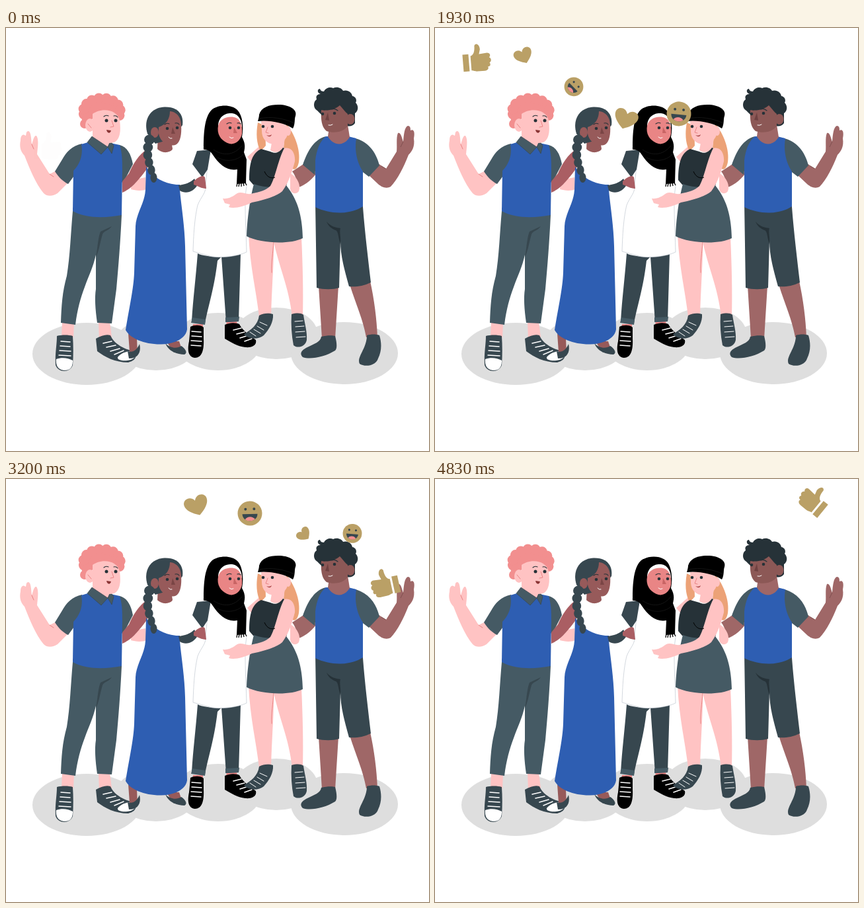
Write an HTML page that moves like this. It is 640 by 640 pixels and loops after 4860 ms.

```html
<!DOCTYPE html>
<html lang="en">
<head>
<meta charset="utf-8">
<title>Friends and reactions</title>
<style>
html, body { margin: 0; width: 100%; height: 100%; overflow: hidden; background: #fff; }
svg { display: block; width: 100vw; height: 100vh; }
.blue { fill: #2e5eb2; } .slate { fill: #455a64; } .dark { fill: #37474f; } .ink { fill: #263238; }
.pink { fill: #ffc3c3; } .rose { fill: #f28f8f; } .warm { fill: #e98585; }
.tan { fill: #9f6767; } .brown { fill: #8c5856; } .mid { fill: #975a5a; } .russet { fill: #aa5e63; }
.white { fill: #fff; } .gold { fill: #baa066; } .blond { fill: #eca277; }
.lace { fill: none; stroke: #fff; stroke-width: 1.5; stroke-linecap: round; }
.thin { stroke-width: 1; }
.line { fill: none; stroke: #263238; stroke-width: 1.1; stroke-linecap: round; }
.fold { fill: none; stroke: #e88585; stroke-width: 1; stroke-linecap: round; }
</style>
</head>
<body>
<svg viewBox="0 0 640 640" xmlns="http://www.w3.org/2000/svg">
<defs>
  <g id="thumb" class="gold">
    <path d="M-19-8L-10-8L-10 18L-19 18Z"/>
    <path d="M-7-5C-2-6 0-12 0-20C2-25 8-22 8-14L6-7L18-8C23-8 24-3 21-1C25 1 24 6 21 7C23 10 22 13 18 13C20 16 17 19 13 19L2 19C-2 19-4 17-7 17Z"/>
  </g>
  <path id="heart" class="gold" d="M0 15C-10 9-18 2-18-6C-18-15-5-18 0-8C5-18 18-15 18-6C18 2 10 9 0 15Z"/>
  <g id="smiley">
    <circle class="gold" r="18.5"/>
    <circle class="dark" cx="-6.5" cy="-6.5" r="2"/><circle class="dark" cx="6.5" cy="-6.5" r="2"/>
    <path class="dark" d="M-11.5 1L11.5 1C11 15-11 15-11.5 1Z"/>
    <path class="rose" d="M-7.5 9C-4 4 4 4 7.5 9C4 12.5-4 12.5-7.5 9Z"/>
  </g>
</defs>

<g fill="#dedede">
  <ellipse cx="122" cy="493" rx="82" ry="47"/><ellipse cx="227" cy="478" rx="62" ry="40"/>
  <ellipse cx="321" cy="474.5" rx="66" ry="43.5"/><ellipse cx="409" cy="462" rx="62" ry="39"/>
  <ellipse cx="512" cy="492" rx="81" ry="47"/>
</g>

<g id="curly">
  <path class="pink" d="M190 230L211 226L213 244C205 247 196 246 189 244Z"/>
  <path class="slate" d="M172 177C183 180 189 190 192 206L178 233L172 234Z"/>
  <path class="russet" d="M213 184C202 190 192 206 186 220L176 232L176 249C188 244 198 234 214 212Z"/>
  <path class="pink" d="M76 216L66 221L47 191C48 180 50 168 46 163C42 162 41 171 39 176C38 168 38 157 34 156C30 156 31 160 30 163C25 159 22 163 22 170C20 180 22 187 28 193C35 211 45 236 57 250C63 256 72 254 78 250L94 234Z"/>
  <path class="fold" d="M66 221L72 225M39 176L42 183"/>
  <path class="slate" d="M115 175C100 178 91 188 85 199L74 217C80 226 86 232 94 236L105 221L122 190Z"/>
  <path class="pink" d="M85 445L103 447L102 468L84 468ZM140 444L157 444L160 468L141 471Z"/>
  <path class="slate" d="M101 272L175 272L175 283C173 325 170 362 167 395L160 447L138 446C135 425 134 408 136 395L136 343C132 362 125 375 119 392C113 408 108 425 105 449L83 446C84 420 85 400 92 375C97 345 98 310 101 277Z"/>
  <path class="dark" d="M143 308L160 300C155 307 148 307 146 312C142 326 141 336 136 347C139 330 139 318 143 308Z"/>
  <path class="blue" d="M114 176L130 171L158 174L172 177C176 190 176 203 176 215L175 283C150 288 120 288 101 277L102 216C112 206 117 192 114 176Z"/>
  <path class="pink" d="M131 153L131 168L153 181L160 170Z"/>
  <path class="slate" d="M130 164L123 173L144 191L154 180ZM154 180L158 171L163 178L160 190Z" stroke="#37474f" stroke-width=".7"/>
  <g class="rose" id="curls"><ellipse cx="144" cy="122" rx="27" ry="18"/></g>
  <path class="pink" d="M131 130C142 121 168 121 172 140C174 155 173 168 164 173C150 177 136 169 131 159Z"/>
  <ellipse class="pink" cx="127" cy="147" rx="7" ry="10"/>
  <circle class="ink" cx="152" cy="140" r="2.5"/><circle class="ink" cx="166" cy="140" r="2.5"/>
  <path class="line" d="M148 134Q151 131 155 133M163 133Q167 132 169 135"/>
  <path class="fold" d="M160 140L163 149L158 150M124 145L129 151"/>
  <path fill="#8b3434" d="M152 154L159 155C158 160 153 160 152 154Z"/>
  <path class="dark" d="M77 466C84 464 95 464 101 466C102 480 102 495 101 510C97 522 79 522 75 510C74 492 77 480 77 466ZM136 470C145 465 152 463 158 465C164 479 180 486 193 489C199 496 197 503 185 506C165 506 150 498 138 489Z"/>
  <path class="white" d="M76 501C84 498 94 499 101 503C101 514 97 518 88 518C79 517 75 511 76 501ZM169 498C176 490 186 488 193 490C199 495 195 502 184 503C175 504 168 502 169 498Z"/>
  <path class="lace" d="M83 474L97 475M82 481L97 482M81 488L98 489M80 495L98 496M147 477L160 474M152 483L166 480M158 489L172 485M164 494L178 488"/>
</g>

<g id="braided">
  <path class="mid" d="M185 462L198 470L199 492L187 490ZM243 474L262 474L266 486L250 486Z"/>
  <path class="dark" d="M184 489C194 492 199 485 202 478C205 490 200 500 186 500ZM241 477C248 484 258 486 265 481C272 485 275 492 270 494C258 494 246 489 241 477Z"/>
  <path class="blue" d="M212 210C225 230 245 237 263 237C262 252 270 290 271 330L274 456C272 470 255 478 235 478.5C210 479 188 470 181 457C187 420 193 395 194 370L196 300C197 280 210 265 211 245Z"/>
  <path class="mid" d="M230 162L229 184C235 190 248 191 252 183L250 170Z"/>
  <path class="white" d="M219 190L228 182C235 190 246 190 254 183C270 181 284 190 291 205L285 229C280 234 272 237 262 237C240 236 222 215 219 190Z"/>
  <path class="dark" d="M214 160C207 137 220 120 240 119.5C262 119 269 133 267 147L250 168L226 175Z"/>
  <path class="mid" d="M231 150C243 146 248 137 248 126C260 127 265 137 265 147C266 160 264 174 256 177C243 180 233 171 231 160Z"/>
  <ellipse class="mid" cx="225" cy="158" rx="6" ry="8"/>
  <g class="dark" id="braid"></g>
  <circle class="ink" cx="244" cy="152" r="2.3"/><circle class="ink" cx="259" cy="151" r="2.3"/>
  <path class="line" d="M240 146Q243 143 247 145M256 144Q260 143 262 146"/>
  <path fill="#7a4545" d="M252 150L256 160L250 160Z"/>
  <path class="lace thin" d="M246 165Q248 168 251 167"/>
</g>

<g id="veiled">
  <path class="dark" d="M261 238C270 237 279 234 285 228L290 237C284 248 272 252 263 246Z"/>
  <path class="warm" d="M283 448L298 448L298 456L282 456ZM334 441L349 442L350 451L333 451Z"/>
  <path class="dark" d="M290 341C300 347 340 349 355 341L352 444L333 445L326 346L320 352C315 395 306 420 301 447L281 444C283 410 287 380 290 341Z"/>
  <path class="slate" d="M282 438L302 441L301 449L280 446ZM332 438L353 437L352 444L332 445Z"/>
  <path class="white" stroke="#b6bec8" stroke-width=".6" d="M307 186L355 190L364 240C360 260 363 300 364 339C350 346 325 348 312 346L283 338C284 305 286 285 290 268C295 255 303 250 302 238Z"/>
  <path class="dark" d="M289 186L310 184L305 214L297 226L282 206Z"/>
  <path class="russet" d="M284 232C290 226 298 221 301 226L303 243C296 243 290 239 284 237Z"/>
  <path d="M299 184C299 160 300 135 311 124C322 115 342 116 350 124C358 132 360 150 357 165C362 174 362 180 360 188L364 199L363 235L349 236L350 214C335 217 322 206 313 192C309 185 304 184 299 184Z"/>
  <path stroke="#000" stroke-width="1.3" d="M350 234L349 240M353 235L352 240M356 235L356 240M359 234L360 239M362 234L364 238"/>
  <path fill="none" stroke="#222" stroke-width=".6" d="M314 184C328 194 345 193 357 178M320 196C335 204 352 200 360 190"/>
  <path class="white" d="M321 149C321 133 333 128 342 129C352 130 357 140 357 150Z"/>
  <path class="warm" d="M320.5 152C321 138 334 133 345 135C356 137 358 150 357 160C355 171 346 177 338 175C328 172 320 164 320.5 152Z"/>
  <circle class="ink" cx="339" cy="151" r="2.3"/><circle class="ink" cx="352" cy="151" r="2.3"/>
  <path class="line" d="M334 145Q338 142 341 144M350 144Q353 143 355 145"/>
  <path fill="#c86464" d="M345 150L350 159L344 159Z"/>
  <path class="lace thin" d="M338 165Q341 168 344 166"/>
  <path d="M279 452C285 449 295 449 299 453L299 470C300 488 296 499 286 499C276 498 274 488 277 474ZM331 449C340 445 348 446 353 448C358 458 370 466 378 472C380 480 372 484 362 483C350 482 340 475 331 470Z"/>
  <path class="lace" d="M281 459L295 460M281 466L296 467M280 473L296 474M280 480L295 481M344 457L356 454M349 463L361 460M354 469L367 465M361 474L372 470"/>
</g>

<g id="tall">
  <path class="tan" d="M450 206L433 217C440 226 441 235 438 242C450 240 460 232 470 220Z"/>
  <path class="slate" d="M484 164C464 169 455 190 449 207L467 222L473 190Z"/>
  <path class="tan" d="M473 390L503 390L498 470L478 470ZM520 388L551 383C557 410 561 440 562 468L545 468C540 440 530 420 520 388Z"/>
  <path class="dark" d="M468 264L540 264L540 271C543 310 548 350 552 385C540 391 528 392 519 391C512 365 506 345 506 322L504 393C495 396 480 396 470 393Z"/>
  <path class="ink" d="M485 293C492 301 500 302 506 303C504 308 507 316 506 327C502 315 503 308 499 306C493 304 488 300 485 293Z"/>
  <path class="tan" d="M563 205L575 213L591 187C592 178 590 166 593 159C597 157 599 166 601 172C602 160 603 150 608 148C612 148 612 152 612 155C617 152 619 158 617 167C619 180 614 187 609 192C602 210 592 230 582 240C575 244 568 240 564 237L547 221Z"/>
  <path fill="none" stroke="#7f4f4f" d="M575 213L568 209M601 172L597 180"/>
  <path class="slate" d="M524 166C547 170 560 187 565 208L549 225C544 221 540 218 537 216L524 190Z"/>
  <path class="blue" d="M484 164L518 164L530 167C527 185 531 204 540 217L540 270C520 283 490 282 468 271L468 200C470 185 474 172 484 164Z"/>
  <path class="tan" d="M489 150L487 164C495 179 512 179 520 165L516 140Z"/>
  <path class="ink" d="M471 125C464 121 465 111 470 108C468 102 472 100 476 100C470 98 471 92 475 92C476 95 478 96 481 96C484 90 491 89 495 91C501 88 508 91 510 95C517 93 523 97 524 103C530 104 531 110 529 113C534 118 533 126 528 129L528 144C524 149 520 149 516 148L476 130Z"/>
  <path class="brown" d="M477 124C488 126 498 123 505 117C509 121 512 126 517 130L517 148C512 157 497 160 485 156C478 150 476 140 477 124Z"/>
  <ellipse class="brown" cx="521" cy="138" rx="6.5" ry="8"/>
  <circle class="ink" cx="479" cy="130" r="2.3"/><circle class="ink" cx="497" cy="129" r="2.3"/>
  <path class="line" d="M476 124Q479 122 482 124M493 123Q498 121 502 125"/>
  <path fill="#6f4141" d="M487 128L489 140L483 139Z"/>
  <path class="lace thin" d="M488 147Q491 148 494 146"/>
  <path class="dark" d="M477 467C485 465 494 465 498 466C501 478 501 485 498 488C482 498 460 502 449 498C443 492 448 487 456 483C466 478 476 475 477 467ZM546 465C552 463 560 463 565 465C569 478 568 490 563 500C559 512 542 513 535 508C530 498 546 485 546 465Z"/>
</g>

<g id="blonde">
  <path class="pink" d="M430 220C440 224 447 238 443 247C438 253 430 250 430 242ZM365 195L382 180L388 187L373 205Z"/>
  <path class="pink" d="M367 312L405 318C406 350 402 390 401 437L383 437C379 400 369 360 367 312ZM404 318L447 316C449 360 450 400 449 437L433 437C428 390 412 360 404 318Z"/>
  <path class="fold" d="M405 324C404 340 401 355 402 370"/>
  <path class="blond" d="M424 145C437 160 446 185 443 203C441 213 437 216 432 212L420 180ZM381 143C378 160 379 174 385 187L393 178L392 148Z"/>
  <path class="pink" d="M403 168L400 185C407 190 415 188 420 182L422 165Z"/>
  <path class="ink" d="M386 183L400 187C408 191 414 188 419 181L428 185L430 215L424 239C410 243 390 243 374 237L368 230C368 202 373 189 386 183Z"/>
  <path class="slate" d="M375 236C392 242 410 242 424 238C437 255 448 275 449 318C430 328 385 326 364 315C365 285 370 255 375 236Z"/>
  <path class="pink" d="M421 182C433 179 438 191 437 202C433 218 427 235 418 247C410 254 392 260 372 264C360 270 345 274 337 271L339 267L331 265L328 258C338 259 344 254 350 250C356 247 363 252 370 251C385 248 394 245 400 239C408 225 412 198 421 182Z"/>
  <path d="M391 217C395 226 401 228 407 226" fill="none" stroke="#000"/>
  <path class="pink" d="M386 141C400 138 424 143 428 152C427 166 420 175 406 176C394 175 387 168 387 155Z"/>
  <ellipse class="pink" cx="427" cy="156" rx="4" ry="7"/>
  <path d="M381 141C382 137 383 134 383 131C386 120 398 116 412 116C430 116 441 124 438 133C436 138 438 145 434 152C420 143 398 139 381 141Z"/>
  <path d="M383 137C400 133 422 137 436 144" fill="none" stroke="#222" stroke-width=".6"/>
  <circle class="ink" cx="389" cy="149" r="2.3"/><circle class="ink" cx="403" cy="149" r="2.3"/>
  <path class="fold" d="M396 150L393 158L397 159"/>
  <path fill="#a94444" d="M394 162Q399 164 402 161Q400 167 394 162Z"/>
  <path class="dark" d="M383 435C390 431 398 431 404 433C405 445 398 456 390 465C382 472 365 471 360 463C370 457 381 450 383 435ZM432 433C440 431 446 431 450 434C452 448 456 460 455 472C453 483 440 485 435 480C432 465 431 448 432 433Z"/>
  <path class="lace thin" d="M384 445L395 450M380 451L390 457M375 456L385 462M369 460L378 466M437 444L449 443M438 452L451 451M438 460L452 459M439 468L453 467"/>
</g>

<g id="icons"></g>
</svg>
<script>
const LOOP = 4860, LIFE = 2400, GAP = 400, STEPS = 4;
const make = (parent, tag, attrs) => {
  const el = document.createElementNS('http://www.w3.org/2000/svg', tag);
  for (const k in attrs) el.setAttribute(k, attrs[k]);
  return document.getElementById(parent).appendChild(el);
};

for (let i = 0; i < 11; i++) {
  const a = 2.5 + i * 0.41;
  make('curls', 'circle', { cx: 145 + 28 * Math.cos(a), cy: 126 + 20 * Math.sin(a), r: 7.8 });
}
make('curls', 'circle', { cx: 119, cy: 145, r: 7 });
for (let i = 0; i < 6; i++) {
  make('braid', 'ellipse', { cx: 217 - 4 * Math.sin(i * 0.8) + i * 0.7, cy: 169 + i * 11.5, rx: 8 - i * 0.6, ry: 7.5 });
}

// Heights and angles are spaced evenly over the life of each icon.
const icons = [
  { kind: 'thumb', x: 61, y: [180, 153, 102, 53, 36], turn: [0, 11, 22, 6, -50] },
  { kind: 'heart', x: 134, size: 0.78, y: [115, 96, 62, 28, 9], turn: [30, -10, -38, -8, 10] },
  { kind: 'smiley', x: 210, size: 0.78, y: [161, 133, 83, 34, 7], turn: [10, 38, 45, 15, -25] },
  { kind: 'heart', x: 288.5, y: [171, 147, 98, 51, 27], turn: [-8, 14, 25, -8, -36] },
  { kind: 'smiley', x: 369, y: [139, 118, 78, 41, 20], turn: [20, -8, -28, 14, 45] },
  { kind: 'heart', x: 451, size: 0.62, y: [140, 118, 84, 50, 32], turn: [0, -30, -45, -28, 0] },
  { kind: 'smiley', x: 524, size: 0.78, y: [108, 92, 60, 30, 13], turn: [-30, -15, 45, 20, -10] },
  { kind: 'thumb', x: 575, flip: -1, y: [173, 146, 97, 46, 20], turn: [10, -22, -25, 25, 55] }
];
for (const icon of icons) icon.el = make('icons', 'use', { href: '#' + icon.kind });

// Smooth curve through evenly spaced values.
function curve(v, u) {
  const i = Math.min(STEPS - 1, Math.floor(u * STEPS)), f = u * STEPS - i;
  const b = v[i], c = v[i + 1], a = v[i - 1] ?? b, d = v[i + 2] ?? c;
  return b + 0.5 * f * (c - a + f * (2 * a - 5 * b + 4 * c - d + f * (3 * (b - c) + d - a)));
}

const start = performance.now();
function draw() {
  const t = (performance.now() - start) % LOOP;
  icons.forEach(({ el, x, y, turn, size = 1, flip = 1 }, i) => {
    const u = (t - i * GAP) / LIFE;
    const shown = u > 0 && u < 1;
    el.style.display = shown ? '' : 'none';
    if (!shown) return;
    el.setAttribute('opacity', Math.min(1, u / 0.05, (1 - u) / 0.1));
    el.setAttribute('transform', `translate(${x} ${curve(y, u)}) rotate(${curve(turn, u)}) scale(${size * flip} ${size})`);
  });
  requestAnimationFrame(draw);
}
draw();
</script>
</body>
</html>
```
